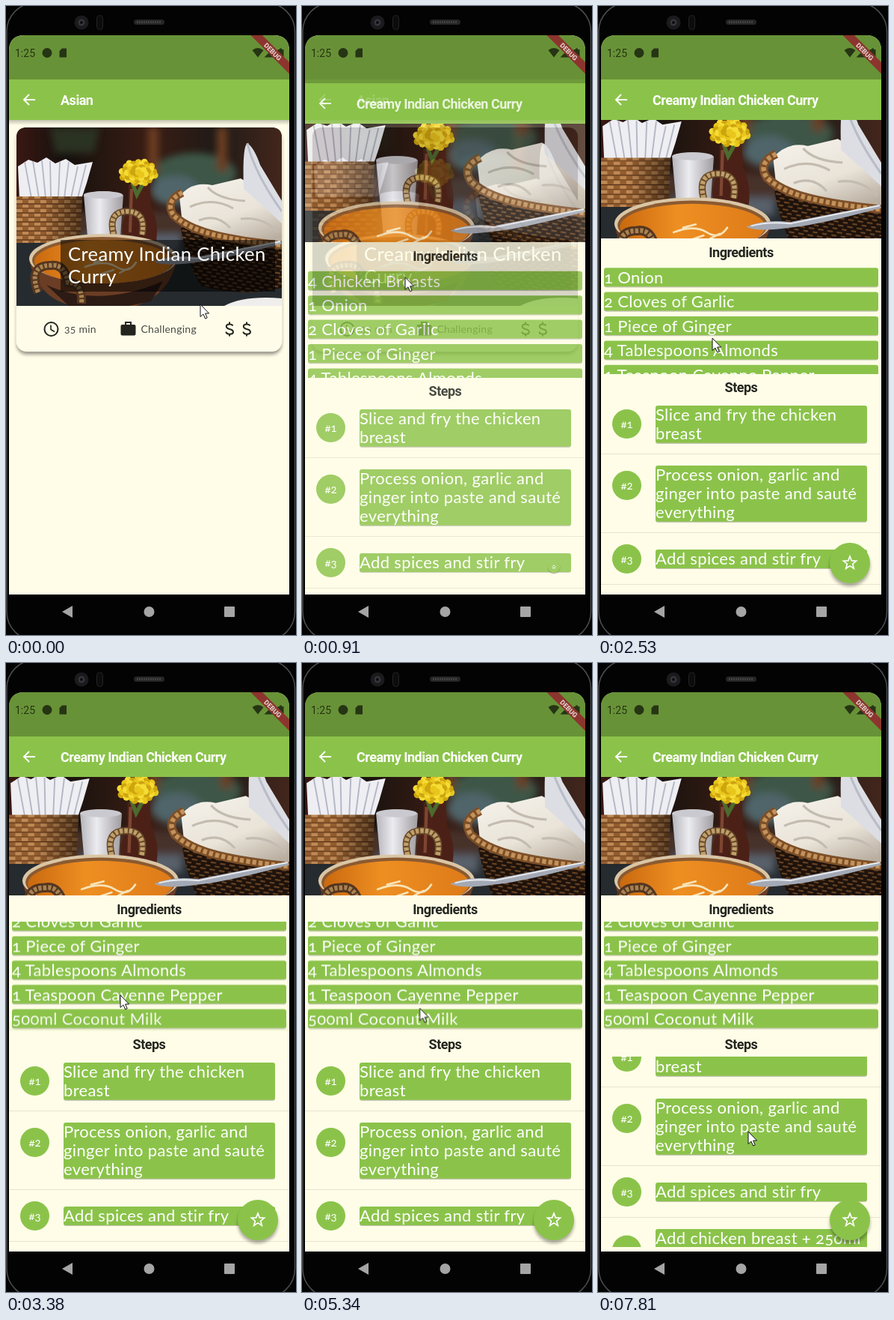
An HTML page that plays this animation: 388 by 839 pixels, repeating every 8 s.

```html
<!DOCTYPE html>
<html lang="en">
<head>
<meta charset="utf-8">
<title>Recipe app</title>
<style>
html, body { margin: 0; width: 100%; height: 100%; overflow: hidden; background: #000; }
svg { display: block; width: 388px; height: 839px; }
text { font-family: Lato, "Open Sans", sans-serif; font-size: 22px; letter-spacing: .36px; fill: #fff; font-variant-numeric: oldstyle-nums; }
.head { font: 700 18px Roboto, sans-serif; letter-spacing: -.5px; }
.dark { fill: #23251f; }
.mid { text-anchor: middle; }
.name { font-size: 25.6px; }
.small { font-size: 14px; letter-spacing: .25px; fill: #4a4a46; }
.num { font-size: 15px; letter-spacing: 0; }
.time { font: 14px Roboto, sans-serif; letter-spacing: 0; fill: #263514; }
.debug { font: 700 9px Roboto, sans-serif; letter-spacing: 0; fill: #e8dcd8; }

#detail, #list, #steps, #fab, #cursor, .glow { animation: 8s infinite steps(3, jump-start); }
#detail { animation-name: enter; animation-timing-function: step-end; }
#fab { animation-name: pop; animation-timing-function: step-end; }
#list { animation-name: list; }
#steps { animation-name: steps; }
#cursor { animation-name: cursor; }
.glow { animation-name: glow; opacity: 0; }

@keyframes enter {
  0% { opacity: 0; transform: translateY(187px); }
  9.5% { opacity: .2; transform: translateY(76.5px); }
  11.375% { opacity: .82; transform: translateY(5px); }
  12.875%, 100% { opacity: 1; transform: none; }
}
@keyframes pop {
  0% { transform: scale(0); }
  11.375% { transform: scale(.3); }
  12.875% { transform: scale(.8); }
  14.375%, 100% { transform: scale(1); }
}
@keyframes list {
  0%, 28.25% { transform: translateY(0); }
  33.125%, 35.125% { transform: translateY(-32px); }
  40%, 40.25% { transform: translateY(-64px); animation-timing-function: steps(2, jump-start); }
  43.75%, 49% { transform: translateY(-81.5px); }
  53.875% { transform: translateY(-49px); }
  56.25% { transform: translateY(-49px); animation-timing-function: steps(2, jump-start); }
  59.5%, 59.625% { transform: translateY(0); }
  64.5%, 100% { transform: translateY(-81.5px); }
}
@keyframes steps {
  0%, 94.25% { transform: translateY(0); }
  99.125%, 100% { transform: translateY(-32px); }
}
@keyframes glow {
  0%, 40.25% { opacity: 0; }
  42%, 42.25% { opacity: .14; }
  45.6%, 66.75% { opacity: 0; }
  68.4%, 70% { opacity: .14; }
  76%, 100% { opacity: 0; }
}
@keyframes cursor {
  0% { transform: translate(260px, 398px); }
  1.5% { transform: translate(260px, 398px); animation-timing-function: steps(4, jump-start); }
  8%, 11.375% { transform: translate(133px, 302px); }
  16%, 16.25% { transform: translate(148px, 481px); }
  21.125% { transform: translate(153px, 443px); }
  66.75% { transform: translate(153px, 443px); animation-timing-function: steps(8, jump-start); }
  80.5% { transform: translate(190px, 583px); }
  80.625%, 100% { transform: translate(201px, 625px); }
}
</style>
</head>
<body>
<svg viewBox="0 0 388 839">
  <defs>
    <clipPath id="screen"><path d="M4 785V60Q4 39 25 39H358Q379 39 379 60V785Z"/></clipPath>
    <clipPath id="cardTop"><path d="M14 400V176Q14 162 28 162H355Q369 162 369 176V400Z"/></clipPath>
    <clipPath id="banner"><rect x="4" y="152" width="375" height="158"/></clipPath>
    <clipPath id="listBox"><rect x="4" y="345" width="375" height="146"/></clipPath>
    <clipPath id="stepBox"><rect x="4" y="525" width="375" height="254"/></clipPath>
    <filter id="soft" x="-30%" y="-30%" width="160%" height="160%"><feGaussianBlur stdDeviation="5"/></filter>
    <filter id="shade" x="-30%" y="-30%" width="160%" height="160%"><feGaussianBlur stdDeviation="2"/></filter>
    <linearGradient id="wall">
      <stop stop-color="#3a1712"/><stop offset=".18" stop-color="#15110e"/>
      <stop offset=".5" stop-color="#3a1d14"/><stop offset=".75" stop-color="#201a17"/><stop offset="1" stop-color="#43261c"/>
    </linearGradient>
    <linearGradient id="curry">
      <stop stop-color="#c9690f"/><stop offset=".4" stop-color="#ee8f22"/><stop offset="1" stop-color="#dd7a18"/>
    </linearGradient>
    <linearGradient id="bread" x2=".5" y2="1">
      <stop stop-color="#f6f3ec"/><stop offset=".6" stop-color="#e9e3d8"/><stop offset="1" stop-color="#b9aea0"/>
    </linearGradient>
    <linearGradient id="cup">
      <stop stop-color="#b4b4bb"/><stop offset=".4" stop-color="#ececf0"/><stop offset="1" stop-color="#a09ca0"/>
    </linearGradient>
    <linearGradient id="dim">
      <stop offset=".4" stop-opacity="0"/><stop offset="1" stop-opacity=".5"/>
    </linearGradient>
    <linearGradient id="fall" x2="0" y2="1">
      <stop stop-color="#000" stop-opacity=".24"/><stop offset="1" stop-color="#000" stop-opacity="0"/>
    </linearGradient>
    <pattern id="weave" width="16" height="12" patternUnits="userSpaceOnUse">
      <rect width="16" height="12" fill="#935c2e"/>
      <path d="M0 3H8M8 9H16" stroke="#bd8a55" stroke-width="4"/>
      <path d="M0 6H16M0 12H16" stroke="#55301a"/>
    </pattern>
    <pattern id="wicker" width="12" height="9" patternUnits="userSpaceOnUse" patternTransform="rotate(9)">
      <rect width="12" height="9" fill="#1e120b"/>
      <path d="M0 2H7M6 6.500H12" stroke="#6a4424" stroke-width="2"/>
    </pattern>
    <g id="photo">
      <rect width="355" height="238" fill="#262b2f"/>
      <rect width="355" height="132" fill="url(#wall)"/>
      <g filter="url(#soft)">
        <path d="M44 0H112L104 34H52Z" fill="#2a3022"/>
        <ellipse cx="238" cy="62" rx="56" ry="28" fill="#3d5647"/>
        <ellipse cx="212" cy="84" rx="32" ry="20" fill="#50656b"/>
        <path d="M176 0H190V62H176ZM268 0H282V58H268Z" fill="#6b3c24"/>
        <path d="M0 112H355V146H0Z" fill="#47302a"/>
        <path d="M90 142H220V165H90Z" fill="#59616a"/>
      </g>
      <path d="M4 95L2 52L16 43L28 47L40 40L52 48L66 42L78 50L102 46L94 74L86 98Z" fill="#eeeef3"/>
      <path d="M11 46L20 94M22 45L30 94M34 44L39 94M45 45L46 94M58 46L56 94M70 46L64 94M82 52L73 94M93 50L82 94" stroke="#b3b6c4" stroke-width="1.800" fill="none"/>
      <path d="M0 92H88L85 154H0Z" fill="url(#weave)"/>
      <path d="M0 92H88L85 154H0Z" fill="url(#dim)"/>
      <path d="M90 90Q116 80 143 90L139 145H95Z" fill="url(#cup)"/>
      <ellipse cx="116" cy="90" rx="26" ry="5" fill="#c9c9cf"/>
      <path d="M150 76H178L180 106Q192 128 186 158H142Q138 128 150 106Z" fill="#4b2117"/>
      <path d="M154 82L152 140" stroke="#7d4632" stroke-width="4"/>
      <path d="M155 74L161 90L170 74" stroke="#4c6b2d" stroke-width="5" fill="none"/>
      <g id="petals"/>
      <path d="M222 128L218 92Q235 71 262 77L300 68Q338 88 355 120V170Q290 152 240 136Z" fill="url(#bread)"/>
      <path d="M304 82Q302 25 309 21Q318 27 326 50L355 98V128Q330 104 304 82Z" fill="#dcdee4"/>
      <path d="M309 21Q318 60 355 112" fill="none" stroke="#b9bdc8" stroke-width="3"/>
      <path d="M232 106Q262 92 290 108M256 80Q270 96 306 98M300 122Q330 118 350 140M244 124Q268 114 286 134" stroke="#c4bcb0" stroke-width="3" fill="none"/>
      <path d="M218 124Q280 150 355 154V214Q300 227 246 211Q226 176 218 124Z" fill="url(#wicker)"/>
      <g fill="none">
        <path d="M222 87Q198 98 210 117Q228 134 264 143T355 157" stroke="#7d4f28" stroke-width="11"/>
        <path d="M222 87Q198 98 210 117Q228 134 264 143T355 157" stroke="#c3925a" stroke-width="6" stroke-dasharray="5 3"/>
      </g>
      <path d="M17 175Q26 226 74 238H160Q206 222 215 175Z" fill="#6b3d24"/>
      <path d="M40 210Q110 242 196 205L180 232L150 238H70Z" fill="#2c1b15"/>
      <g fill="none">
        <path d="M130 143Q122 112 148 112T168 143" stroke="#6a4a2b" stroke-width="9"/>
        <path d="M130 143Q122 112 148 112T168 143" stroke="#bfa06a" stroke-width="6" stroke-dasharray="4 2"/>
      </g>
      <ellipse cx="116" cy="175" rx="99" ry="33" fill="#dac6a6"/>
      <ellipse cx="116" cy="177" rx="95" ry="31" fill="#8b5a30"/>
      <ellipse cx="116" cy="179" rx="92" ry="29" fill="url(#curry)"/>
      <path d="M92 186Q118 176 134 186T160 180M112 196L130 190M104 180L120 176M138 194L150 188" fill="none" stroke="#f8e3b8" stroke-width="2.500" stroke-linecap="round"/>
      <path d="M184 179Q206 169 240 173L353 151L355 155Q278 176 240 180Q198 186 184 179Z" fill="#a3a9b5"/>
      <path d="M190 178Q212 172 240 175L353 152" fill="none" stroke="#e8eaee" stroke-width="1.800"/>
      <g fill="none">
        <path d="M29 220Q15 184 46 184Q64 181 69 207Q89 207 87 235" stroke="#553620" stroke-width="12"/>
        <path d="M29 220Q15 184 46 184Q64 181 69 207Q89 207 87 235" stroke="#a88250" stroke-width="6" stroke-dasharray="4 2"/>
      </g>
      <path d="M278 238Q304 224 355 228V238Z" fill="#f0eeec"/>
    </g>
    <path id="back" d="M39 125H24.5M31 118L24 125L31 132" fill="none" stroke="#fff" stroke-width="1.9"/>
  </defs>

  <rect width="388" height="839" fill="#030303"/>
  <rect x="1" y="-4" width="385.500" height="850" rx="38" fill="none" stroke="#4b4d50" stroke-width="1.500"/>
  <circle cx="101" cy="22" r="9.500" fill="#1b1b1d"/><circle cx="101" cy="22" r="4.500" fill="#34363b"/><circle cx="101" cy="22" r="2" fill="#0d0e12"/>
  <rect x="121.500" y="12.500" width="8" height="19" rx="4" fill="#0c0c0d" stroke="#242425"/>
  <rect x="171" y="18" width="41" height="7" rx="3.500" fill="#262627"/>
  <path d="M175 21.500H208" stroke="#424244" stroke-width="3" stroke-dasharray="2 1"/>

  <g clip-path="url(#screen)">
    <rect x="4" y="39" width="375" height="746" fill="#fffde7"/>
    <rect x="4" y="39" width="375" height="59" fill="#689237"/>
    <rect x="4" y="98" width="375" height="54" fill="#8bc34a"/>
    <rect x="4" y="152" width="375" height="7" fill="url(#fall)"/>
    <use href="#back"/>
    <text class="head" x="73" y="132">Asian</text>

    <rect x="14" y="166" width="355" height="299" rx="14" opacity=".38" filter="url(#shade)"/>
    <rect x="13.500" y="162" width="356" height="299" rx="14" fill="#fffde9"/>
    <g clip-path="url(#cardTop)">
      <use href="#photo" x="14" y="162"/>
      <rect x="73" y="312" width="287" height="69" opacity=".54"/>
    </g>
    <text class="name" x="83" y="340">Creamy Indian Chicken</text>
    <text class="name" x="83" y="370">Curry</text>
    <g fill="none" stroke="#24241f" stroke-width="2">
      <circle cx="60.500" cy="431" r="9"/><path d="M60 425.500V431.500L65 434.500" stroke-width="1.600"/>
      <path d="M160 425V422H167V425"/>
      <rect x="154.500" y="426" width="18" height="12.500" rx="1" fill="#24241f"/>
      <path id="dollar" d="M303.500 426.500Q302.500 424.500 299 424.500Q294.800 424.500 294.800 427.500Q295 430 299 431Q304 432 304 435Q303.500 437.700 299.300 437.700Q295 437.700 294.300 434.500M299 421.500V425M299 437V440.500"/>
      <use href="#dollar" x="23"/>
    </g>
    <text class="small" x="78" y="436">35 min</text>
    <text class="small" x="180.500" y="436">Challenging</text>

    <g id="detail">
      <rect x="4" y="39" width="375" height="746" fill="#fffde7"/>
      <rect x="4" y="39" width="375" height="59" fill="#689237"/>
      <rect x="4" y="98" width="375" height="54" fill="#8bc34a"/>
      <use href="#back"/>
      <text class="head" x="73" y="132">Creamy Indian Chicken Curry</text>
      <g clip-path="url(#banner)"><use href="#photo" transform="translate(4 105.400) scale(1.0563)"/></g>
      <text class="head dark mid" x="191.500" y="334.500">Ingredients</text>
      <g clip-path="url(#listBox)">
        <g id="list"></g>
        <ellipse class="glow" cx="191.500" cy="497" rx="230" ry="32" fill="#8bc34a"/>
      </g>
      <text class="head dark mid" x="191.500" y="514.500">Steps</text>
      <g clip-path="url(#stepBox)"><g id="steps"></g></g>
      <g transform="translate(337 743)">
        <g id="fab">
          <circle cy="4" r="27" opacity=".33" filter="url(#shade)"/>
          <circle r="27" fill="#8bc34a"/>
          <path id="star" fill="none" stroke="#fff" stroke-width="1.700"/>
        </g>
      </g>
    </g>

    <text class="time" x="12" y="68">1:25</text>
    <g fill="#263514">
      <circle cx="55" cy="62.500" r="6.500"/>
      <path d="M75 56.500H81V68.500H71.500V60Z"/>
      <path d="M329.500 59Q337 53 344.500 59L337 68.500Z"/>
      <path d="M358 56V68.500H345.500Z"/>
      <path d="M363.500 58H366V56.500H369V58H371.500V68.500H363.500Z"/>
    </g>
    <path d="M327.400 39H343L379 75V90.600Z" fill="#8c352e"/>
    <text class="debug mid" transform="translate(357 61) rotate(45)" y="3.200">DEBUG</text>
  </g>

  <g fill="#a5a5a5">
    <path d="M75 808L89 800V816Z"/>
    <circle cx="191.500" cy="808" r="7"/>
    <rect x="292" y="801" width="14" height="14" rx="1"/>
  </g>
  <path id="cursor" d="M0 0V16.500L3.900 13L6.600 19L9.200 17.900L6.600 12H11.600Z" fill="#fff" stroke="#111" stroke-width="1"/>
</svg>
<script>
const byId = id => document.getElementById(id);

const box = (x, y, w, h) =>
  `<rect x="${x}" y="${y + 1.2}" width="${w}" height="${h}" rx="3" opacity=".22"/>
   <rect x="${x}" y="${y}" width="${w}" height="${h}" rx="3" fill="#8bc34a"/>`;
const label = (x, y, s) => `<text x="${x}" y="${y}">${s}</text>`;

const foods = ["4 Chicken Breasts", "1 Onion", "2 Cloves of Garlic", "1 Piece of Ginger",
  "4 Tablespoons Almonds", "1 Teaspoon Cayenne Pepper", "500ml Coconut Milk"];
byId("list").innerHTML = foods.map((s, i) => {
  const y = 348.8 + i * 32.4;
  return box(8, y, 367, 25) + label(8, y + 20.7, s);
}).join("");

// top of the text box, centre of the badge, divider below, lines
const steps = [
  [533, 557.5, 597.5, ["Slice and fry the chicken", "breast"]],
  [613, 639.5, 702.5, ["Process onion, garlic and", "ginger into paste and sauté", "everything"]],
  [725, 737.5, 771.5, ["Add spices and stir fry"]],
  [787, 815, 860, ["Add chicken breast + 250ml", "water"]]
];
byId("steps").innerHTML = steps.map(([y, cy, end, lines], i) =>
  box(77, y, 283, lines.length * 24.9) +
  lines.map((s, k) => label(77, y + 20.3 + k * 24.9, s)).join("") +
  `<circle cx="38.500" cy="${cy}" r="19.500" fill="#8bc34a"/>
   <text class="num mid" x="38.500" y="${cy + 5.5}">#${i + 1}</text>
   <path d="M4 ${end}H379" stroke="#e6e4d1"/>`).join("");

byId("star").setAttribute("d", "M" + Array.from({ length: 10 }, (_, i) => {
  const r = i % 2 ? 3.9 : 9, a = i * Math.PI / 5;
  return `${(r * Math.sin(a)).toFixed(2)} ${(-r * Math.cos(a)).toFixed(2)}`;
}).join("L") + "Z");

// flower head: spiral of small petals
byId("petals").innerHTML = Array.from({ length: 46 }, (_, i) => {
  const n = 45 - i, r = Math.sqrt(n / 46), a = n * 2.4;
  const x = 163 + 24 * r * Math.cos(a), y = 60 + 15 * r * Math.sin(a);
  return `<circle cx="${x.toFixed(1)}" cy="${y.toFixed(1)}" r="4.500" fill="${["#e9c61c", "#f5dc35", "#cda50f"][i % 3]}"/>`;
}).join("");
</script>
</body>
</html>
```
